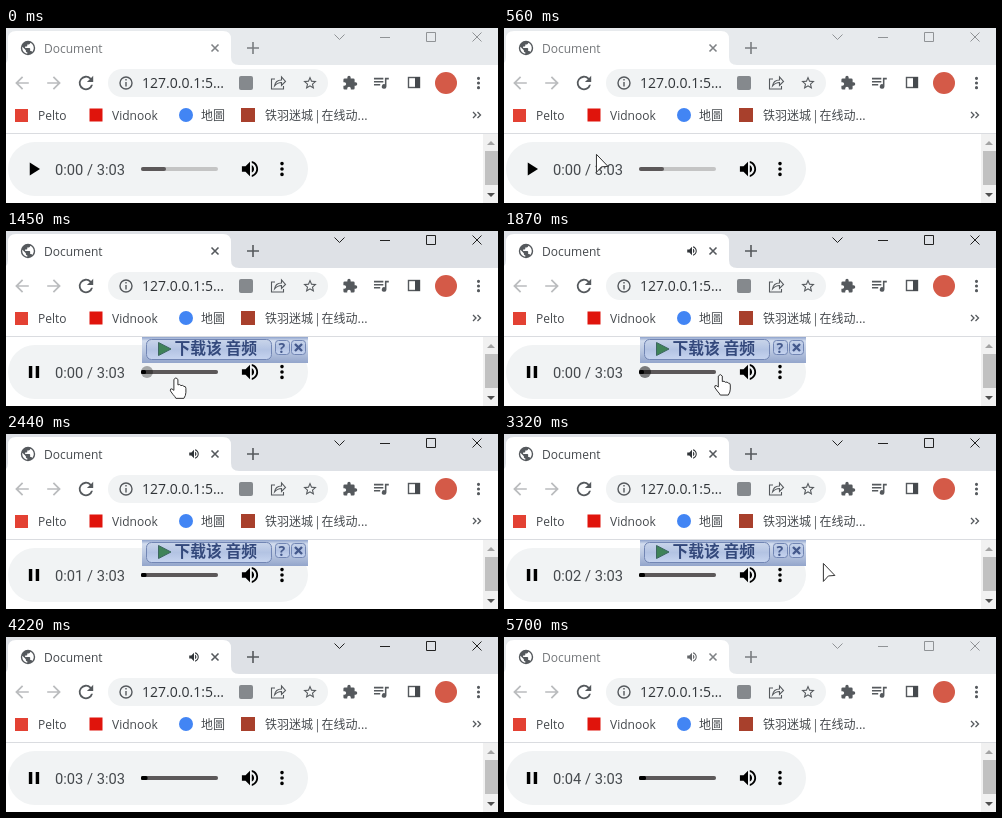
These frames come from a looping animation (492 by 175 pixels, 5.76 s). An HTML page:

```html
<!DOCTYPE html>
<html lang="en">
<head>
<meta charset="utf-8">
<title>Audio controls</title>
<style>
  html, body { margin: 0; width: 100%; height: 100%; overflow: hidden; background: #fff; }
  svg { display: block; }
  text { font: 12px "Open Sans", "Noto Sans CJK SC", sans-serif; fill: #45494d; white-space: pre; }
  .line { fill: none; stroke: #55595d; }
</style>
</head>
<body>
<svg width="492" height="175" viewBox="0 0 492 175">
  <defs>
    <linearGradient id="metal" x2="0" y2="1">
      <stop offset="0" stop-color="#8fa3cc"/><stop offset=".15" stop-color="#d3ddee"/>
      <stop offset=".6" stop-color="#b5c3de"/><stop offset="1" stop-color="#93a5cb"/>
    </linearGradient>
    <linearGradient id="button" x2="0" y2="1">
      <stop offset="0" stop-color="#c9d5ea"/><stop offset=".5" stop-color="#b3c3e3"/><stop offset="1" stop-color="#c6d4ef"/>
    </linearGradient>
  </defs>

  <!-- Tab strip -->
  <rect id="strip" width="492" height="37"/>
  <path fill="#fff" d="M-6 37q8 0 8-8V11q0-8 8-8H217q8 0 8 8V29q0 8 8 8z"/>
  <g id="heading">
    <text x="38" y="25">Document</text>
    <path class="line" stroke-width="1.600" d="M205.500 16.500l7 7m0-7l-7 7"/>
    <path class="line" stroke-width="1.600" d="M241 20h12m-6-6v12"/>
    <g id="tabSound"></g>
  </g>
  <path id="windowButtons" class="line" d="M328.500 6.500l5 5 5-5M374 9.500h10M420.500 4.500h9v9h-9zM466.500 4.500l9 9m0-9l-9 9"/>

  <!-- Toolbar -->
  <rect x="102" y="41" width="220" height="28" rx="14" fill="#f1f3f4"/>
  <g class="line" stroke-width="1.400">
    <circle cx="120" cy="55" r="6"/><path d="M120 54v4.500m0-7.500v1.500"/>
    <path d="M269 51h-3.500v10h12v-3M268.500 58q1-6 7-6v-3l4 4.500-4 4v-3q-4 0-7 3.500z" stroke-width="1.100"/>
    <rect x="402.500" y="49.500" width="11" height="10"/>
  </g>
  <text x="136" y="60" style="font-size:14px;fill:#303438">127.0.0.1:5…</text>
  <rect x="233" y="48" width="14" height="14" rx="2" fill="#85898d"/>
  <path fill="#45494d" d="M409 49h5v11h-5z"/>
  <circle cx="440" cy="55" r="11" fill="#d45a48"/>

  <!-- Bookmarks -->
  <rect x="9" y="81" width="13" height="13" fill="#e34133"/>
  <rect x="83.500" y="80.500" width="13" height="13" fill="#e0140c"/>
  <circle cx="180" cy="87" r="7" fill="#4285f4"/>
  <rect x="235" y="80" width="14" height="14" fill="#a8402c"/>
  <text x="32" y="91.500">Pelto</text>
  <text x="106" y="91.500">Vidnook</text>
  <text x="195" y="91.500">地圖</text>
  <text x="259" y="91.500" style="font-family:'Noto Sans CJK SC', sans-serif">铁羽迷城 | 在线动...</text>
  <path class="line" stroke-width="1.300" d="M467 84l3 3-3 3m4.500-6l3 3-3 3"/>
  <path stroke="#dadce0" d="M0 105.500h492"/>

  <!-- Scrollbar -->
  <path fill="#f1f1f1" d="M477 106h15v69h-15z"/>
  <path fill="#c1c1c1" d="M479 123h13v34h-13z"/>
  <path fill="#a3a3a3" d="M481 117l4-4 4 4z"/>
  <path fill="#505050" d="M481 165l4 4 4-4z"/>

  <!-- Player -->
  <rect x="2" y="114" width="300" height="54" rx="27" fill="#f1f3f4"/>
  <circle id="ripple" cx="28" cy="141" r="16" fill="#e5e7e8"/>
  <text id="clock" x="49" y="146.500" style="font:14.700px Roboto, sans-serif"></text>
  <rect x="135" y="139" width="77" height="4" rx="2" fill="#c4c4c4"/>
  <rect id="buffered" x="135" y="139" height="4" rx="2" fill="#5c5859"/>
  <circle id="thumb" cx="141" cy="141" r="6"/>
  <rect id="played" x="135" y="139" height="4" rx="1.500"/>

  <!-- Download bar -->
  <g id="bar">
    <rect x="136" y="106" width="166" height="26" fill="url(#metal)"/>
    <rect x="140.500" y="108.500" width="125" height="20" rx="5" fill="url(#button)" stroke="#7286b4"/>
    <path d="M152.500 111.500v13l12.500-6.500z" fill="#3f8358" stroke="#3c6660"/>
    <text x="168.500" y="123" style="font:bold 15.800px 'Noto Sans CJK SC', sans-serif;fill:#34497c">下载该 音频</text>
    <g fill="url(#button)" stroke="#7286b4">
      <rect x="269.500" y="109.500" width="14" height="14" rx="3"/>
      <rect x="285.500" y="109.500" width="14" height="14" rx="3"/>
    </g>
    <text x="272.500" y="121.500" style="font-weight:bold;font-size:14px;fill:#44598c">?</text>
    <path d="M289 113l7 7m0-7l-7 7" stroke="#44598c" stroke-width="2.400"/>
  </g>

  <g id="cursor" fill="#fff" stroke="#333" stroke-linejoin="round">
    <path id="arrow" d="M.5 .5v18l5-5.500 6.500-.5z"/>
    <path id="hand" d="M-1.500 2q2-3 4 0v5.500q2-1 3 .700 2-.700 3 .800 2-.200 2 2v4q0 3-2 6H.500q-1-2-3-4L-5 13.500q-.500-2.500 1.500-2l2 1.500z"/>
  </g>
</svg>

<script>
const LOOP = 5760;
const svg = document.querySelector("svg");
const $ = id => document.getElementById(id);

const PLAY = "M8 5v14l11-7z";
const PAUSE = "M6 19h4V5H6zM14 5v14h4V5z";
const SOUND = "M3 9v6h4l5 5V4L7 9H3zm13.500 3c0-1.770-1.020-3.290-2.500-4.030v8.050c1.480-.730 2.500-2.250 2.500-4.020zM14 3.230v2.060c2.890.860 5 3.540 5 6.710s-2.110 5.850-5 6.710v2.060c4.010-.910 7-4.490 7-8.770s-2.990-7.860-7-8.770z";
const GLOBE = "M12 2a10 10 0 1 0 0 20a10 10 0 1 0 0-20zm-1 17.930c-3.950-.490-7-3.850-7-7.930 0-.620.080-1.210.210-1.790L9 15v1c0 1.100.9 2 2 2zm6.900-2.540c-.260-.810-1-1.390-1.900-1.390h-1v-3c0-.550-.450-1-1-1H8v-2h2c.550 0 1-.450 1-1V7h2c1.100 0 2-.9 2-2v-.410c2.930 1.190 5 4.060 5 7.410 0 2.080-.8 3.970-2.100 5.390z";
const BACK = "M20 11H7.830l5.590-5.590L12 4l-8 8 8 8 1.410-1.410L7.830 13H20z";
const FORWARD = "M12 4l-1.410 1.410L16.170 11H4v2h12.170l-5.580 5.590L12 20l8-8z";
const RELOAD = "M17.650 6.350A8 8 0 1 0 19.730 14h-2.080A6 6 0 1 1 16.220 7.780L13 11h7V4z";
const STAR = "M22 9.240l-7.190-.620L12 2 9.190 8.630 2 9.240l5.460 4.730L5.820 21 12 17.270 18.180 21l-1.630-7.030zM12 15.400l-3.760 2.270 1-4.280-3.320-2.880 4.380-.380L12 6.100l1.710 4.040 4.380.380-3.320 2.880 1 4.280z";
const PUZZLE = "M20.500 11H19V7a2 2 0 0 0-2-2h-4V3.500a2.500 2.500 0 0 0-5 0V5H4a2 2 0 0 0-2 2v3.800h1.500a2.700 2.700 0 0 1 0 5.400H2V20a2 2 0 0 0 2 2h3.800v-1.500a2.700 2.700 0 0 1 5.400 0V22H17a2 2 0 0 0 2-2v-4h1.500a2.500 2.500 0 0 0 0-5z";
const QUEUE = "M15 6H3v2h12zM15 10H3v2h12zM3 16h8v-2H3zM17 6v8.180a3 3 0 1 0 2 2.820V8h3V6z";
const DOTS = [6, 12, 18].map(y => `M10 ${y}a2 2 0 1 0 4 0a2 2 0 1 0-4 0`).join("");

function icon(path, cx, cy, scale, fill = "#55595d", parent = svg) {
  const el = document.createElementNS(svg.namespaceURI, "path");
  el.setAttribute("d", path);
  el.setAttribute("fill", fill);
  el.setAttribute("transform", `translate(${cx} ${cy}) scale(${scale}) translate(-12 -12)`);
  return parent.appendChild(el);
}

icon(GLOBE, 22, 20, .72);
icon(SOUND, 188, 20, .53, "#303438", $("tabSound"));
icon(BACK, 16, 55, .85, "#babcbe");
icon(FORWARD, 48, 55, .85, "#babcbe");
icon(RELOAD, 80, 55, .9);
icon(STAR, 304, 55, .68);
icon(PUZZLE, 344, 55, .66);
icon(QUEUE, 375, 54.5, .78);
icon(DOTS, 472.5, 55, .78);
const playIcon = icon(PLAY, 27.5, 141, .93, "#000");
const pauseIcon = icon(PAUSE, 28, 141, .86, "#000");
icon(SOUND, 244, 141, .9, "#000");
icon(DOTS, 276, 141, .9, "#000");
svg.append($("bar"), $("cursor"));

// Pointer trips: [time, x, y]
const trips = [
  [[200, 286, 172], [320, 250, 128], [440, 160, 113], [600, 70, 130], [730, 28, 141],
   [1150, 28, 141], [1410, 148, 146], [1640, 268, 148], [1870, 216, 143], [2010, 188, 150],
   [2080, 184, 153], [2440, 120, 178]],
  [[3010, 454, 172], [3150, 385, 148], [3320, 319, 129], [3530, 293, 116],
   [3700, 293, 116], [3860, 330, 138], [4020, 372, 176]]
];

function pointerAt(t) {
  const trip = trips.find(p => t >= p[0][0] && t < p.at(-1)[0]);
  if (!trip) return null;
  const i = trip.findIndex(p => p[0] > t);
  const [t0, x0, y0] = trip[i - 1], [t1, x1, y1] = trip[i];
  const k = (t - t0) / (t1 - t0);
  return [x0 + (x1 - x0) * k, y0 + (y1 - y0) * k];
}

const clamp = v => Math.max(0, Math.min(1, v));
const show = (el, on) => el.style.display = on ? "" : "none";
const set = (id, name, value) => $(id).setAttribute(name, value);

function draw(t) {
  const focused = t >= 840 && t < 5700;
  const playing = t >= 880;
  const seconds = Math.max(0, Math.floor((t - 1100) / 1040));

  set("strip", "fill", focused ? "#dee1e6" : "#e7eaed");
  set("heading", "opacity", focused ? 1 : .75);
  $("windowButtons").style.stroke = focused ? "#222" : "#909396";
  show($("tabSound"), t >= 1650);

  show(playIcon, !playing);
  show(pauseIcon, playing);
  set("ripple", "opacity", playing ? clamp((1350 - t) / 250) : 0);
  $("clock").textContent = `0:0${seconds} / 3:03`;
  set("buffered", "width", playing ? 77 : 25);
  set("played", "width", t < 1450 ? 0 : 5 + seconds * .5);
  set("thumb", "opacity", .5 * clamp((t - 1400) / 80) * clamp((2200 - t) / 100));
  show($("bar"), t >= 910 && t < 3700);

  const pos = pointerAt(t);
  show($("cursor"), pos);
  if (!pos) return;
  const [x, y] = pos;
  const onControl = Math.abs(y - 141) < 14 && (x < 44 || x > 125 && x < 290);
  set("cursor", "transform", `translate(${x} ${y})`);
  show($("hand"), onControl);
  show($("arrow"), !onControl);
}

const start = performance.now();
(function tick() {
  draw((performance.now() - start) % LOOP);
  requestAnimationFrame(tick);
})();
</script>
</body>
</html>
```
